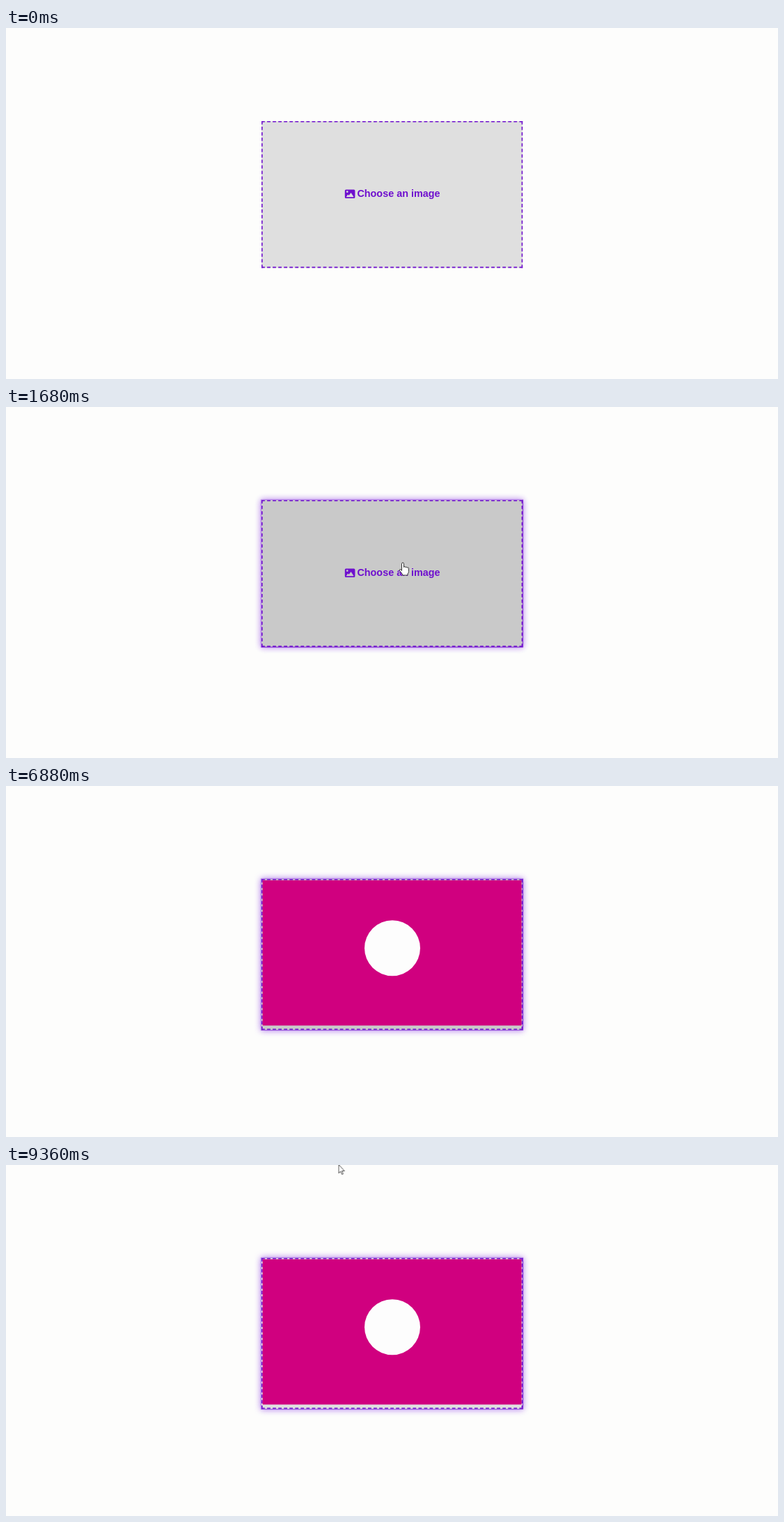
An HTML page that plays this animation: 1109x505 px, repeating every 9400 ms.

```html
<!DOCTYPE html>
<html lang="en">
<head>
<meta charset="utf-8">
<title>Image picker</title>
<style>
  :root { --accent: #6f10ce; --idle: #dfdfdf; --hover: #c9c9c9; --loop: 9400ms infinite; }
  html, body { margin: 0; width: 100%; height: 100%; overflow: hidden; background: #fdfdfc; }
  svg { position: absolute; overflow: visible; }

  /* The page is shown at 80 %, which also sets the dash length. */
  .picker {
    position: absolute; left: 367px; top: 134px; width: 469px; height: 264px;
    transform: scale(.8); transform-origin: 0 0;
    box-sizing: border-box; border: 2px dashed var(--accent); background: var(--idle);
    animation: hover var(--loop) linear, grow var(--loop) step-end;
  }
  .glow {
    position: absolute; inset: -2px; opacity: 0;
    box-shadow: 0 0 0 1px rgba(111, 16, 206, .85), 0 0 11px 2px rgba(122, 30, 225, .6);
    animation: focus var(--loop) linear;
  }
  .label { left: .5px; top: .5px; fill: var(--accent); font: bold 14.4px "Liberation Sans", Arial, sans-serif; }
  .preview {
    position: absolute; left: 0; top: 0; width: 465px; height: 260.5px;
    background: #d0007f; visibility: hidden; animation: preview var(--loop) step-end;
  }
  .preview::after {
    content: ""; position: absolute; left: 183px; top: 72px;
    width: 100px; height: 100px; border-radius: 50%; background: #fdfdfd;
  }

  .cursor {
    left: 0; top: 0; width: 1px; height: 1px;
    fill: #fff; stroke: #222; stroke-linejoin: round;
    animation: travel var(--loop) linear, present var(--loop) step-end;
  }
  .arrow { animation: arrow var(--loop) step-end; }
  .hand { animation: hand var(--loop) step-end; }

  @keyframes hover {
    0%, 10.2% { background: var(--idle); }
    12.55%, 94.6% { background: var(--hover); }
    97%, 100% { background: var(--idle); }
  }
  @keyframes grow {
    0% { height: 264px; }
    70.2%, 100% { height: 271px; }
  }
  @keyframes preview {
    0% { visibility: hidden; }
    70.2%, 100% { visibility: visible; }
  }
  @keyframes focus {
    0%, 14.9% { opacity: 0; }
    18%, 21% { opacity: 1; }
    25.1%, 70.2% { opacity: 0; }
    73%, 100% { opacity: 1; }
  }
  @keyframes travel {
    0%, 3.83% { transform: translate(1090px, 395px); }
    4.26% { transform: translate(1040px, 325px); }
    5.11% { transform: translate(1000px, 266px); }
    7.23% { transform: translate(1000px, 266px); animation-timing-function: ease-in-out; }
    12.34% { transform: translate(577px, 222px); }
    14.9%, 36.6% { transform: translate(570px, 224px); }
    79.15% { transform: translate(1104px, 335px); }
    80% { transform: translate(984px, 312px); }
    81.28% { transform: translate(738px, 268px); }
    82.98% { transform: translate(600px, 243px); }
    85.1% { transform: translate(520px, 232px); }
    88.3% { transform: translate(478px, 227px); }
    90.64% { transform: translate(478px, 227px); animation-timing-function: ease-in-out; }
    99.57%, 100% { transform: translate(477.5px, -1px); }
  }
  @keyframes present {
    0% { visibility: hidden; }
    3.82% { visibility: visible; }
    36.58% { visibility: hidden; }
    79.14%, 100% { visibility: visible; }
  }
  @keyframes arrow {
    0% { opacity: 1; }
    10.2% { opacity: 0; }
    36.6% { opacity: 1; }
    81.1% { opacity: 0; }
    94.6%, 100% { opacity: 1; }
  }
  @keyframes hand {
    0% { opacity: 0; }
    10.2% { opacity: 1; }
    36.6% { opacity: 0; }
    81.1% { opacity: 1; }
    94.6%, 100% { opacity: 0; }
  }
</style>
</head>
<body>
  <div class="picker">
    <div class="glow"></div>
    <svg class="label" width="464" height="260">
      <g transform="scale(1.25)">
        <path fill-rule="evenodd" d="M119 96h11.4a1.6 1.6 0 0 1 1.6 1.6v9.4a1.6 1.6 0 0 1-1.6 1.6H119a1.6 1.6 0 0 1-1.6-1.6v-9.4a1.6 1.6 0 0 1 1.6-1.6ZM119.4 99.2a1.4 1.4 0 1 0 2.8 0a1.4 1.4 0 1 0-2.8 0ZM119.3 106.8h10.9l-4-6.3-3.1 4.2-1.4-1.6Z"/>
        <text x="135" y="107">Choose an image</text>
      </g>
    </svg>
    <div class="preview"></div>
  </div>
  <svg class="cursor">
    <path class="arrow" transform="scale(.8)" d="M.5 .5V16L4 12.8 6.4 18.2 8.6 17.2 6.3 12H11Z"/>
    <path class="hand" stroke-width=".9" d="M-1.5 1.5a1.5 1.5 0 0 1 3 0V6.5a1.3 1.3 0 0 1 2.5.3a1.3 1.3 0 0 1 2.3.6a1.2 1.2 0 0 1 2.2.8V12.5q0 2-1.5 3.5V18H-.5V16.5L-4.5 11.5q-.8-1.5.5-2q1.2-.2 2.5 2Z"/>
  </svg>
</body>
</html>
```
